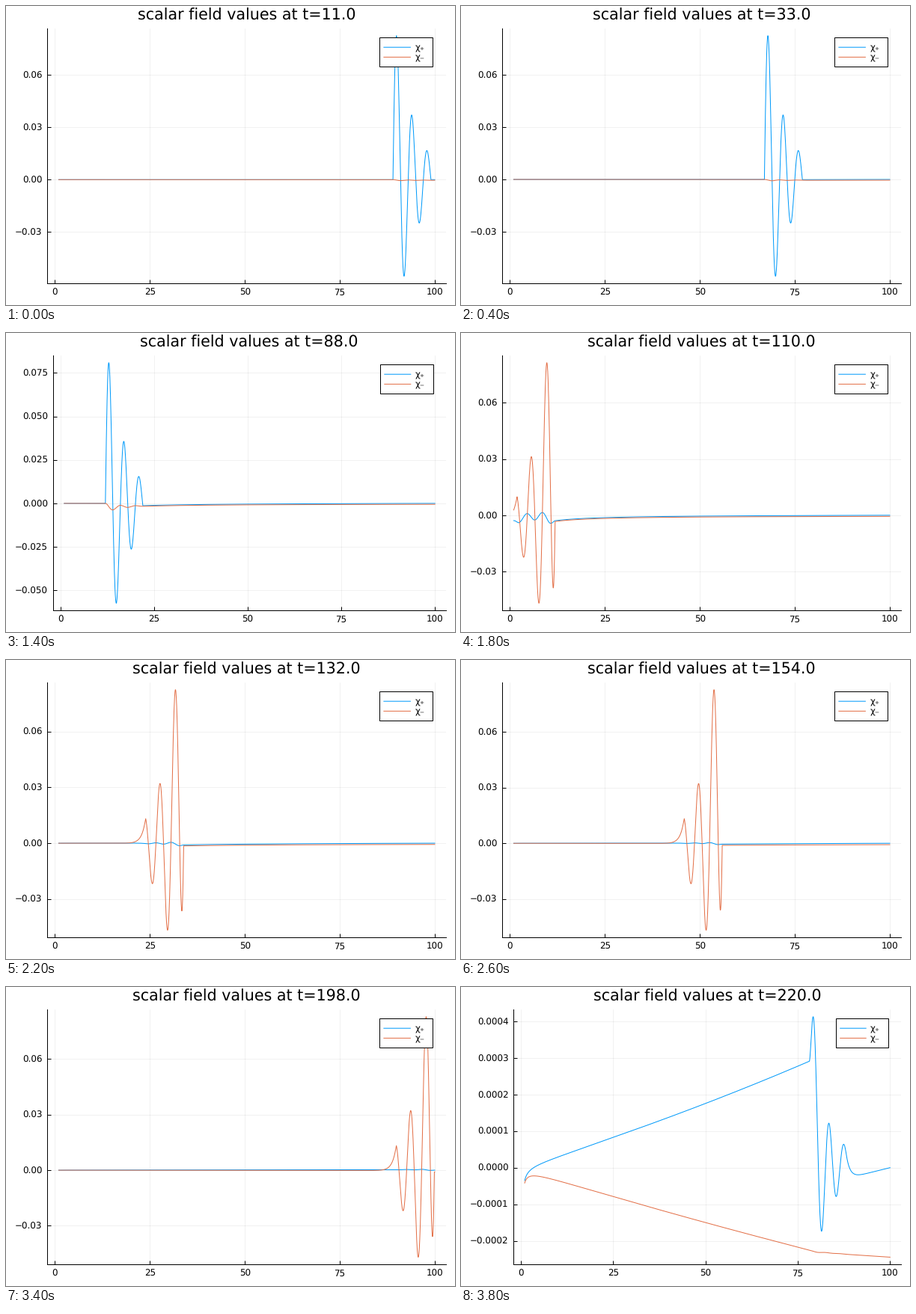
A matplotlib script that plays this animation: 600x400 px, repeating every 4 s.

```python
import numpy as np
import matplotlib.pyplot as plt
from matplotlib.animation import FuncAnimation
from matplotlib.patches import Rectangle

W, H, DPI = 600, 400, 100
PT = 72 / DPI                    # points per pixel
EM, TITLE_EM = 11.84, 20.7       # font sizes in pixels
TOP, BOTTOM, RIGHT = 30.1, 371.1, 588
BLUE, ORANGE = "#009AFA", "#E36F47"
R_IN, R_OUT = 1, 100
LAG = 0.12                       # delay of the reflection at R_IN
FRAMES, T_STEP = 20, 11

plt.rcParams.update({"font.family": "DejaVu Sans", "text.hinting": "none"})


def solve(t_end, dt=0.005):
    """Ingoing part F(t+r) and outgoing part G(t-r) of r*phi, with their slopes."""
    n = int(round(t_end / dt)) + 2
    s = np.arange(n) * dt
    pulse = np.where(s < 10, 0.1 * np.exp(-s / 5) * np.sin(np.pi * s / 2), 0)
    trip = int(round((2 * (R_OUT - R_IN) + LAG) / dt))
    F, G, dF, dG = np.zeros((4, n))
    for i in range(n):
        back = G[i - trip] if i >= trip else 0
        dF[i] = (pulse[i] + (F[i] + back) / R_OUT) / 2
        dG[i] = dF[i] - (F[i] + G[i]) / R_IN
        if i + 1 < n:
            F[i + 1] = F[i] + dt * dF[i]
            G[i + 1] = G[i] + dt * dG[i]
    return s, F, G, dF, dG


S, F, G, DF, DG = solve(FRAMES * T_STEP)
r = np.linspace(R_IN, R_OUT, 1981)


def fields(t):
    w, z = t - R_OUT + r, t - r - (R_OUT - 2 * R_IN) - LAG

    def at(x, y):
        return np.interp(x, S, y, left=0)

    u = (at(w, F) + at(z, G)) / r
    return 2 * at(w, DF) - u, -2 * at(z, DG) - u


def nice_ticks(lo, hi):
    """Score tick steps by count, zero, coverage and roundness."""
    span, best = hi - lo, (-1, None, None)
    order = int(np.floor(np.log10(span)))
    for z in (order, order - 1, order - 2):
        for q, nice in ((1, 1), (5, .9), (2, .7), (2.5, .5), (3, .2)):
            step = q * 10.0 ** z
            k = np.arange(np.ceil(lo / step), np.floor(hi / step) + 1)
            n = len(k)
            if not 4 <= n <= 8:
                continue
            score = ((1 - abs(n - 6) / 6) / 4 + (0 in k) / 6
                     + 0.5 * span / ((n - 1) * step) + nice / 4)
            if score > best[0]:
                best = score, k * step, -z + (q == 2.5)
    return best[1], best[2]


def label(v, digits):
    text = f"{abs(v):.{digits}f}"
    return "\u2212" + text if v < 0 and float(text) else text


def text_width(text):
    return EM * sum({".": .318, "\u2212": .838}.get(c, .636) for c in text)


fig = plt.figure(figsize=(W / DPI, H / DPI), dpi=DPI, facecolor="white")
ax = fig.add_axes([0.1, 0.1, 0.8, 0.8])
ax.set_axisbelow(True)
ax.grid(color="black", alpha=0.1, lw=0.55 * PT)
ax.tick_params(direction="in", length=5 * PT, width=PT,
               pad=7 * PT, labelsize=EM * PT)
for side, spine in ax.spines.items():
    spine.set_visible(side in ("left", "bottom"))
    spine.set_linewidth(PT)
pad = 0.03 * (R_OUT - R_IN)
ax.set_xlim(R_IN - pad, R_OUT + pad)
ax.set_xticks(range(0, 101, 25))
curves = [ax.plot([], [], color=c, lw=PT)[0] for c in (BLUE, ORANGE)]

# overlay in pixel coordinates for title and legend
top = fig.add_axes([0, 0, 1, 1])
top.set_xlim(0, W)
top.set_ylim(H, 0)
top.axis("off")
title = top.text(0, 18.6, "", ha="center", va="baseline", size=TITLE_EM * PT)
box = top.add_patch(Rectangle((0, 41.9), 1, 38.9, fc="white", ec="black", lw=PT))
keys = []
for y, color, name in ((55.2, BLUE, "χ₊"), (68.4, ORANGE, "χ₋")):
    line, = top.plot([], [], color=color, lw=PT, snap=False)
    text = top.text(0, y + 4, name, va="baseline", size=EM * PT)
    keys.append((y, line, text))


def place(left):
    width = RIGHT - left
    ax.set_position([left / W, 1 - BOTTOM / H, width / W, (BOTTOM - TOP) / H])
    title.set_x((left + RIGHT) / 2 - 0.3)
    gap = width / 90
    x1 = RIGHT - 0.033 * width
    x0 = x1 - width / 10 - 18.2
    box.set_x(x0)
    box.set_width(x1 - x0)
    for y, line, text in keys:
        line.set_data([x0 + gap, x0 + gap + width / 15], [y, y])
        text.set_x(x0 + 2 * gap + width / 15)


def update(i):
    t = T_STEP * (i + 1)
    values = fields(t)
    for curve, v in zip(curves, values):
        curve.set_data(r, v)
    lo, hi = np.min(values), np.max(values)
    margin = 0.03 * (hi - lo)
    lo, hi = lo - margin, hi + margin
    ticks, digits = nice_ticks(lo, hi)
    names = [label(v, digits) for v in ticks]
    ax.set_yticks(ticks, names)
    ax.set_ylim(lo, hi)
    place(19.1 + max(map(text_width, names)))
    title.set_text(f"scalar field values at t={t:.1f}")
    return curves


anim = FuncAnimation(fig, update, frames=FRAMES, interval=200,
                     init_func=lambda: update(0), repeat=True, repeat_delay=0)
plt.show()
```
